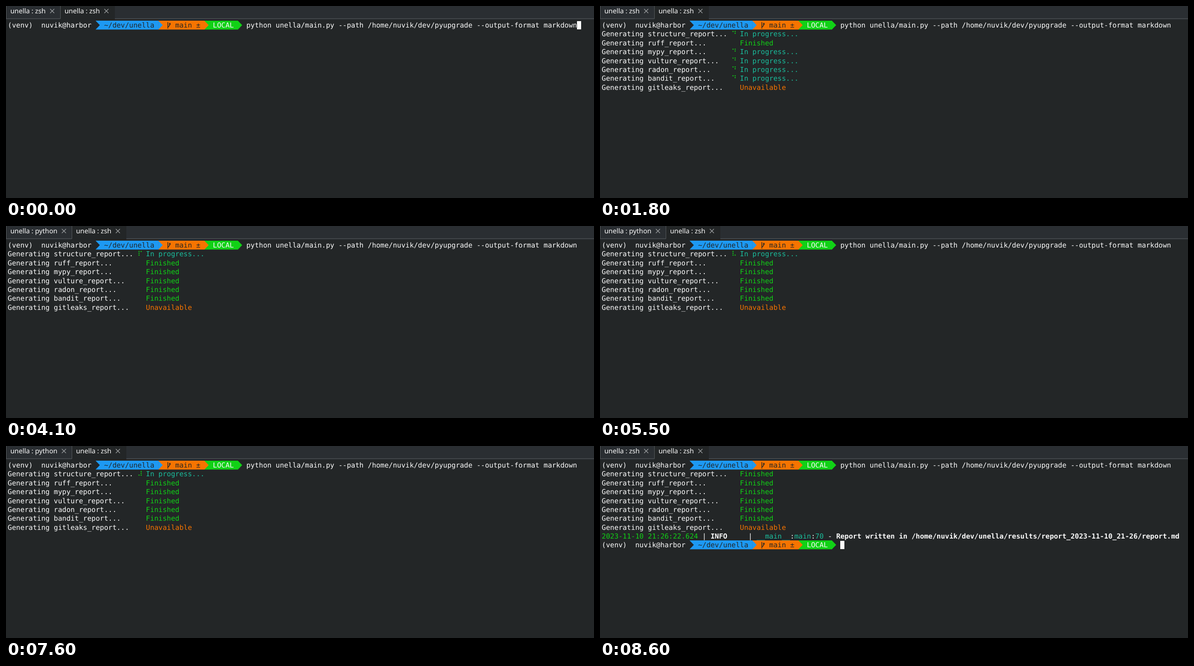
An HTML page with a canvas that plays this animation: 1280 by 419 pixels, repeating every 9900 ms.

```html
<!DOCTYPE html>
<html lang="en">
<head>
<meta charset="utf-8">
<style>
  html, body { margin: 0; width: 100%; height: 100%; overflow: hidden; background: #232627; }
  canvas { display: block; }
</style>
</head>
<body>
<canvas id="stage" width="1280" height="419"></canvas>
<script>
const ctx = document.getElementById('stage').getContext('2d');
ctx.textRendering = 'geometricPrecision';

const LOOP = 9900;
const CELL = 9.113, ROW = 19.35, LEFT = 3.8, TOP = 32.3;
const BG = '#232627', BAR = '#2a2e32', LINE = '#54585b';
const WHITE = '#fcfcfc', GREEN = '#11d116', CYAN = '#1abc9c';
const ORANGE = '#f67400', BLUE = '#1d99f3';

const HOME = '/home/nuvik/dev';
const COMMAND = `python unella/main.py --path ${HOME}/pyupgrade --output-format markdown`;
const REPORT = `Report written in ${HOME}/unella/results/report_2023-11-10_21-26/report.md`;

// Report name and the time its job ends
const JOBS = [
  ['structure', 7900], ['ruff', 1800], ['mypy', 2600], ['vulture', 2100],
  ['radon', 2200], ['bandit', 2400], ['gitleaks', 0]
];
const SPINNER = '⠋⠙⠹⠸⠼⠴⠦⠧⠇⠏';

const cellX = col => LEFT + col * CELL;
const rowY = row => TOP + row * ROW;

function rect(x, y, w, h, color) {
  ctx.fillStyle = color;
  ctx.fillRect(x, y, w, h);
}

// Writes text on the character grid and returns the next free column
function write(row, col, text, color = WHITE, weight = 'normal') {
  ctx.font = `${weight} 15.13px "DejaVu Sans Mono", monospace`;
  ctx.fillStyle = color;
  for (const char of text) ctx.fillText(char, cellX(col++), rowY(row) + 14.8);
  return col;
}

function cursor(row, col) {
  rect(Math.round(cellX(col)), Math.round(rowY(row)) + 1, 9, 18, WHITE);
}

function arrow(row, col, color) {
  const x = cellX(col), y = Math.round(rowY(row));
  ctx.fillStyle = color;
  ctx.beginPath();
  ctx.moveTo(x - 0.3, y);
  ctx.lineTo(x + CELL, y + 9.7);
  ctx.lineTo(x - 0.3, y + 19.4);
  ctx.fill();
}

function branchIcon(row, col) {
  ctx.save();
  ctx.translate(cellX(col), rowY(row));
  ctx.strokeStyle = ctx.fillStyle = BG;
  ctx.lineWidth = 1.5;
  ctx.beginPath();
  ctx.moveTo(2.3, 3);
  ctx.lineTo(2.3, 17);
  ctx.moveTo(2.3, 13.5);
  ctx.quadraticCurveTo(6.6, 11.5, 6.6, 7);
  ctx.stroke();
  ctx.beginPath();
  ctx.moveTo(6.6, 3.8);
  ctx.lineTo(9, 8);
  ctx.lineTo(4.2, 8);
  ctx.fill();
  ctx.restore();
}

function prompt(row) {
  const y = Math.round(rowY(row));
  write(row, 0, '(venv)  nuvik@harbor');
  for (const [from, to, color] of [[21, 36, BLUE], [36, 47, ORANGE], [47, 55, GREEN]])
    rect(cellX(from), y, (to - from) * CELL, 19.4, color);
  arrow(row, 21, BG);
  arrow(row, 36, BLUE);
  arrow(row, 47, ORANGE);
  arrow(row, 55, GREEN);
  write(row, 23, '~/dev/unella', BG);
  branchIcon(row, 38);
  write(row, 40, 'main ±', BG);
  write(row, 49, 'LOCAL');
}

// Braille dots 1-6: down the left column, then down the right
function spinner(row, t) {
  let step = Math.floor((Math.min(t, 7799) - 1800) / 100);
  if (step >= 5) step--;
  const glyph = SPINNER[Math.floor(1.1 + step * 1.28) % SPINNER.length];
  const bits = glyph.charCodeAt(0) - 0x2800;
  for (let i = 0; i < 6; i++)
    if (bits >> i & 1)
      rect(288.5 + 4.6 * (i > 2), rowY(row) + 2.8 + 4 * (i % 3), 2.2, 2.2, GREEN);
}

function tabs(process) {
  const title = `unella : ${process}`;
  ctx.font = '14.7px "Noto Sans", sans-serif';
  const firstText = ctx.measureText(title).width;
  const split = Math.round(firstText + 41);
  const end = split + 119;
  rect(0, 0, 1280, 30, BAR);
  rect(split, 0, end - split, 30, BG);
  rect(0, 27, split, 1, LINE);
  rect(end, 27, 1280 - end, 1, LINE);
  rect(0, 0, 1, 28, LINE);
  rect(split, 0, 1, 28, LINE);
  for (const [x, text] of [[9.5, title], [split + 9.5, 'unella : zsh']]) {
    ctx.fillStyle = WHITE;
    ctx.fillText(text, x, 16);
    const cx = x + ctx.measureText(text).width + 14.2, cy = 11;
    ctx.strokeStyle = '#a5a8aa';
    ctx.lineWidth = 1.1;
    ctx.beginPath();
    for (const s of [-1, 1]) {
      ctx.moveTo(cx - 4.5, cy - 4.5 * s);
      ctx.lineTo(cx + 4.5, cy + 4.5 * s);
    }
    ctx.stroke();
  }
}

function jobList(t) {
  JOBS.forEach(([name, end], i) => {
    const row = i + 1;
    write(row, 0, `Generating ${name}_report...`);
    if (!end) write(row, 33, 'Unavailable', ORANGE);
    else if (t >= end) write(row, 33, 'Finished', GREEN);
    else {
      spinner(row, t);
      write(row, 33, 'In progress...', CYAN);
    }
  });
}

function logLine(row) {
  const parts = [
    ['2023-11-10 21:26:22.624', GREEN], [' | '], ['INFO     ', WHITE, 'bold'], ['| '],
    ['__main__', CYAN], [':'], ['main', CYAN], [':'], ['70', CYAN], [' - '],
    [REPORT, WHITE, 'bold']
  ];
  let col = 0;
  for (const part of parts) col = write(row, col, ...part);
}

function draw(now) {
  const t = now % LOOP;
  rect(0, 0, 1280, 419, BG);
  tabs(t >= 2400 && t < 8600 ? 'python' : 'zsh');
  prompt(0);
  const end = write(0, 57, COMMAND);
  if (t < 1600) cursor(0, end);
  else if (t < 1800) cursor(1, 0);
  else jobList(t);
  if (t >= 8000) {
    logLine(8);
    if (t >= 8100) prompt(9);
    cursor(9, t < 8100 ? 0 : 57);
  }
  requestAnimationFrame(draw);
}
requestAnimationFrame(draw);
</script>
</body>
</html>
```
